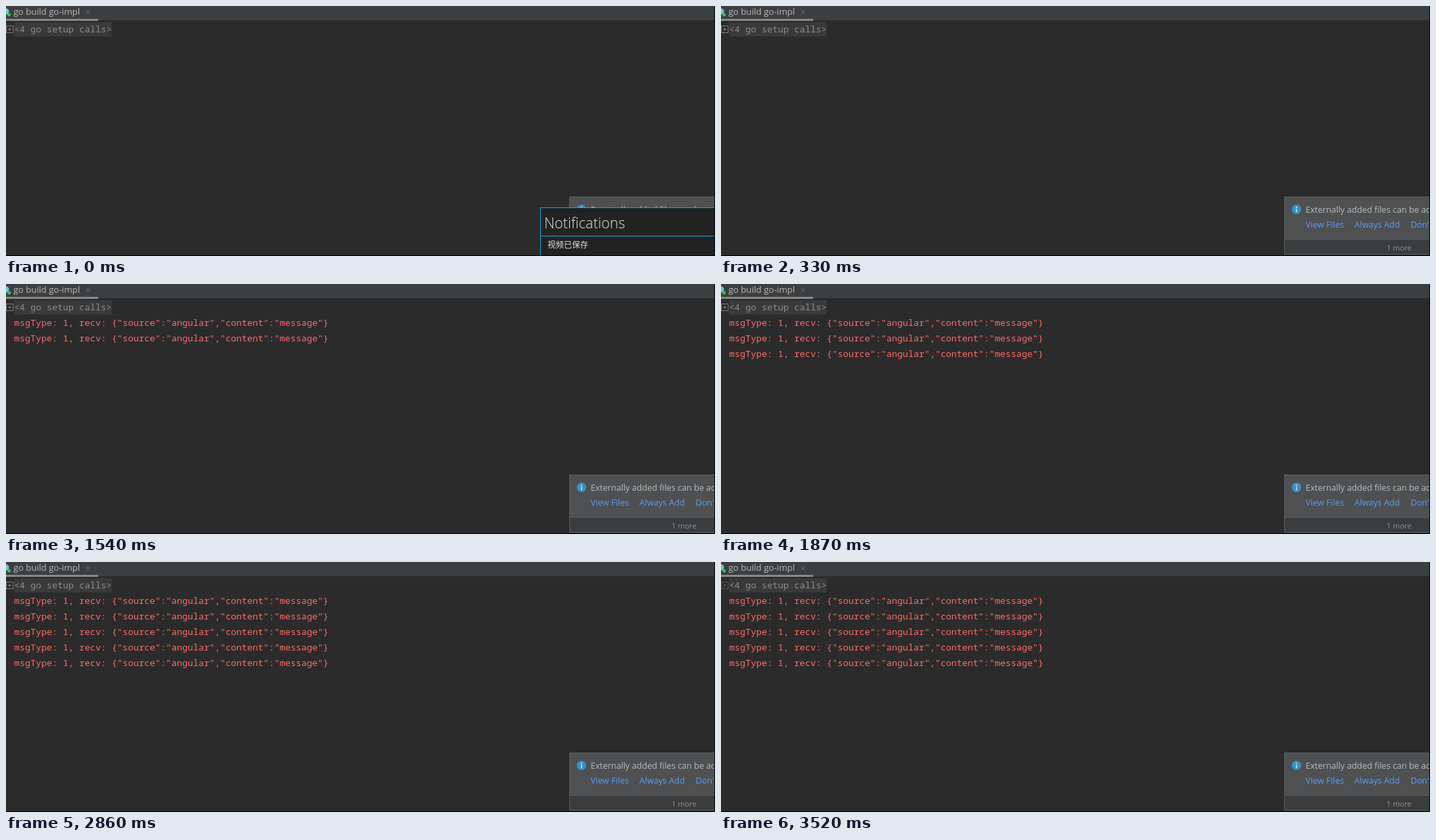
Animation, 1046 px wide and 370 px high, one loop 3850 ms. Source, as an HTML page:

```html
<!DOCTYPE html>
<html lang="en">
<head>
<meta charset="utf-8">
<title>Run console</title>
<style>
  html, body { margin: 0; width: 100%; height: 100%; overflow: hidden; background: #2b2b2b; }
  svg { display: block; width: 1046px; height: 370px; }
  text { white-space: pre; }
  .ui { font: 12.6px "Open Sans", "Noto Sans", sans-serif; fill: #bbbbbb; }
  .mono { font: 13.3333px "Noto Sans Mono", "DejaVu Sans Mono", monospace; }
  .link { fill: #589df6; }
  .log { font-weight: 500; fill: #ff6b68; }
</style>
</head>
<body>
<svg viewBox="0 0 1046 370">
  <rect width="1046" height="370" fill="#2b2b2b"/>

  <!-- tab strip -->
  <rect width="1046" height="21" fill="#3c3f41"/>
  <circle cx="0" cy="8" r="4.5" fill="#6fc3dc"/>
  <circle cx="4.5" cy="13" r="2.5" fill="#23d13b"/>
  <text class="ui" x="11" y="13" style="font-size:13px">go build go-impl</text>
  <path d="M118 6l6 6m0-6l-6 6" stroke="#6c6d70"/>
  <rect y="19" width="136" height="3" fill="#898989"/>

  <!-- folded line -->
  <rect x="12" y="24" width="144" height="21" fill="#3a3a3a"/>
  <path id="fold" d="M.5 29.5h10v10h-10zM3 34.5h5M5.5 32v5" fill="none" stroke="#808080"/>
  <text class="mono" x="12" y="39" fill="#8c8c8c">&lt;4 go setup calls&gt;</text>

  <g id="log"></g>

  <!-- balloon -->
  <g>
    <rect x="831.5" y="282.5" width="220" height="85" fill="#4e5052" stroke="#5c6164"/>
    <rect x="832" y="346" width="220" height="21" fill="#3a3c3d"/>
    <path d="M832 345.5h214" stroke="#55585a"/>
    <circle cx="849" cy="301" r="7" fill="#3592c4"/>
    <path d="M849 297v2m0 1.2v5" stroke="#d3dbe0" stroke-width="1.8"/>
    <text class="ui" x="862.5" y="306">Externally added files can be added to Git</text>
    <g class="ui">
      <text class="link" x="862.5" y="328">View Files</text>
      <text class="link" x="934.5" y="328">Always Add</text>
      <text class="link" x="1017.5" y="328">Don't Ask Again</text>
    </g>
    <text class="ui" x="982" y="362" style="font-size:11.1px;fill:#929292">1 more</text>
  </g>

  <!-- recorder toast -->
  <g id="toast">
    <rect x="788.5" y="298.5" width="262" height="75" fill="#222222" stroke="#1ba1e2"/>
    <path d="M789 340.5h257" stroke="#1ba1e2"/>
    <text x="794" y="329" fill="#e4e4e4" style="font:300 21.3px 'Open Sans', 'Noto Sans', sans-serif">Notifications</text>
    <text x="799" y="357.5" fill="#e0e0e0" lang="zh-CN" style="font:12px 'Noto Sans CJK SC', 'Noto Sans CJK', sans-serif">视频已保存</text>
  </g>

  <path d="M0 369.5h1045.5V0" fill="none" stroke="#000"/>
</svg>
<script>
  const LOOP = 3850;
  const STEP = 110;
  const arrivals = [1100, 1540, 1870, 2310, 2860];
  const message = 'msgType: 1, recv: {"source":"angular","content":"message"}';

  const log = document.getElementById('log');
  const toast = document.getElementById('toast');
  const fold = document.getElementById('fold');

  const lines = arrivals.map((at, i) => {
    const el = document.createElementNS('http://www.w3.org/2000/svg', 'text');
    el.setAttribute('class', 'mono log');
    el.setAttribute('x', 12);
    el.setAttribute('y', 62 + 23 * i);
    el.textContent = message;
    log.append(el);
    return el;
  });

  // Linear progress from 0 at a to 1 at b.
  const ramp = (t, a, b) => Math.min(1, Math.max(0, (t - a) / (b - a)));

  function draw(now) {
    const t = Math.floor((now % LOOP) / STEP) * STEP;
    lines.forEach((el, i) => {
      el.style.visibility = t >= arrivals[i] ? 'visible' : 'hidden';
    });
    toast.style.opacity = 1 - ramp(t, 110, 330);
    fold.style.opacity = 1 - 0.5 * ramp(t, 2860, 3300);
  }

  const start = performance.now();
  function tick() {
    draw(performance.now() - start);
    requestAnimationFrame(tick);
  }
  tick();
</script>
</body>
</html>
```
